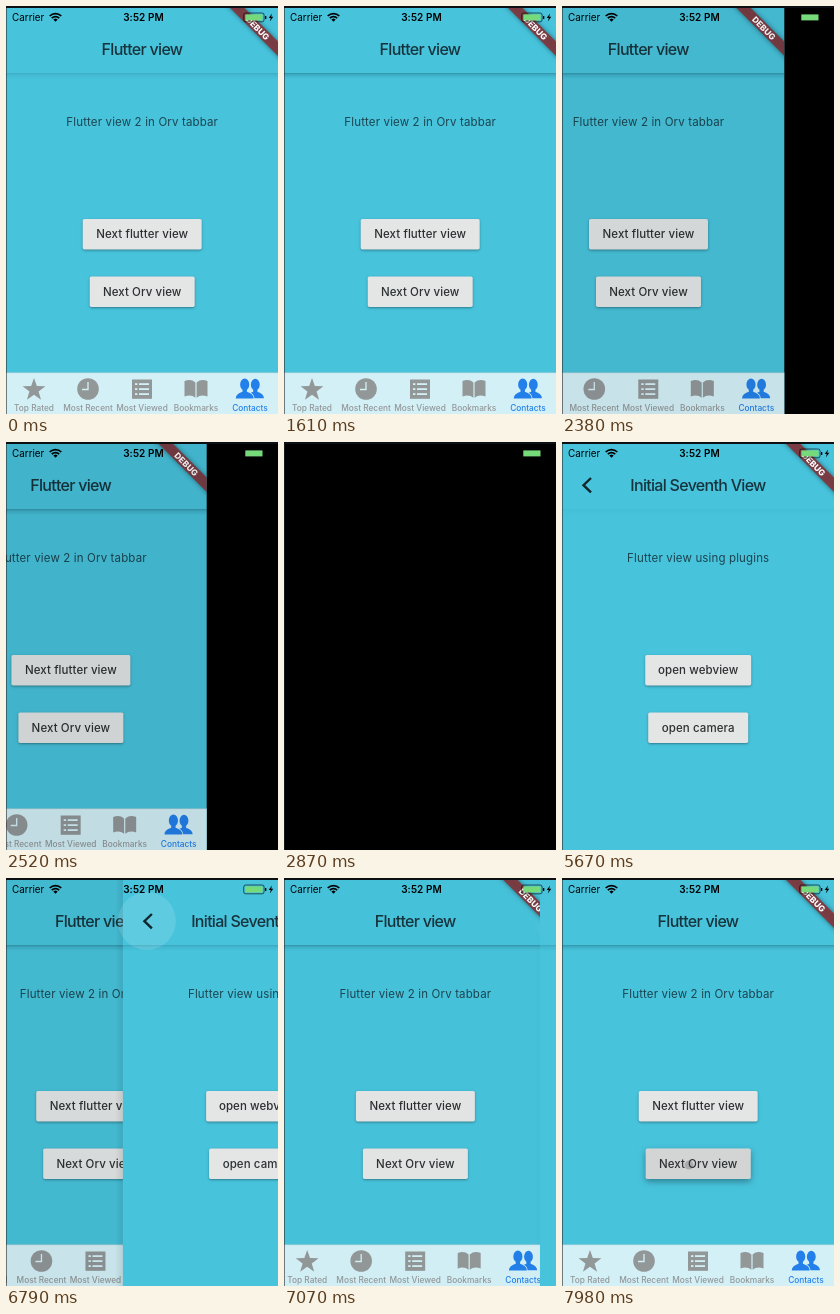
Recreate the animation shown at these times as an HTML page with a canvas. Size 272 px wide and 408 px high, loop 8000 ms.

```html
<!DOCTYPE html>
<html lang="en">
<head>
<meta charset="utf-8">
<title>Flutter tab view</title>
<style>
html, body { margin: 0; width: 100%; height: 100%; overflow: hidden; background: #000; }
canvas { display: block; width: 272px; height: 408px; }
</style>
</head>
<body>
<canvas id="stage" width="272" height="408"></canvas>
<script>
const W = 272, H = 408, LOOP = 8000;
const ctx = document.getElementById('stage').getContext('2d');
const FONT = 'Inter, Roboto, sans-serif';
const BLUE = '#47c3dc', BAR = '#d4f0f7', GRAY = '#929798', ACTIVE = '#2380ea';

// Transition times in ms
const PUSH = 2194, BLANK = 2850, READY = 3570, POP = 6658, POP_END = 7420;

const clamp = v => Math.max(0, Math.min(1, v));
const ramp = (t, from, to) => clamp((t - from) / (to - from));
const pulse = (t, a, b, c, d) => ramp(t, a, b) * (1 - ramp(t, c, d));
const spring = ms => {
  const u = Math.max(0, ms) * 0.011;
  return 1 - (1 + u) * Math.exp(-u);
};

function saved(draw) {
  ctx.save();
  draw();
  ctx.restore();
}

function box(x, y, w, h, color) {
  ctx.fillStyle = color;
  ctx.fillRect(x, y, w, h);
}

function disc(x, y, r, color) {
  ctx.fillStyle = color;
  ctx.beginPath();
  ctx.arc(x, y, r, 0, Math.PI * 2);
  ctx.fill();
}

function line(points, color, width) {
  ctx.strokeStyle = color;
  ctx.lineWidth = width;
  ctx.beginPath();
  points.forEach(([x, y]) => ctx.lineTo(x, y));
  ctx.stroke();
}

function polygon(points, color) {
  ctx.fillStyle = color;
  ctx.beginPath();
  points.forEach(([x, y]) => ctx.lineTo(x, y));
  ctx.fill();
}

function label(text, x, y, size, weight, color, align = 'center', spacing = 0) {
  ctx.font = `${weight} ${size}px ${FONT}`;
  ctx.letterSpacing = spacing + 'px';
  ctx.textAlign = align;
  ctx.textBaseline = 'alphabetic';
  ctx.fillStyle = color;
  ctx.fillText(text, x, y);
}

function button(text, width, y, press = 0, splash = null) {
  const x = 136.2 - width / 2, h = 30.5;
  const shape = () => {
    ctx.beginPath();
    ctx.roundRect(x, y, width, h, 1.8);
  };
  saved(() => {
    ctx.shadowColor = 'rgba(0,0,0,.36)';
    ctx.shadowBlur = 2.4 + press * 4;
    ctx.shadowOffsetY = 0.9 + press * 1.5;
    ctx.fillStyle = '#e4e6e6';
    shape();
    ctx.fill();
  });
  saved(() => {
    shape();
    ctx.clip();
    box(x, y, width, h, `rgba(150,150,150,${0.22 * press})`);
    if (splash) disc(splash.x, splash.y, splash.r, `rgba(110,110,110,${0.4 * splash.alpha})`);
  });
  label(text, 136.2, y + 19.2, 11.5, 500, '#2c3031', 'center', 0.08);
}

function header(title, shadow) {
  const g = ctx.createLinearGradient(0, 67, 0, 73);
  g.addColorStop(0, `rgba(0,40,55,${0.3 * shadow})`);
  g.addColorStop(0.35, `rgba(0,40,55,${0.12 * shadow})`);
  g.addColorStop(1, 'rgba(0,40,55,0)');
  box(0, 67, W, 6, g);
  label(title, 136, 49, 16, 500, '#17333c', 'center', -0.7);
}

function body(text) {
  label(text, 136.2, 120.3, 11.5, 400, '#1c4550', 'center', 0.14);
}

function debugBanner() {
  saved(() => {
    ctx.beginPath();
    ctx.rect(0, 0, W, H);
    ctx.clip();
    ctx.translate(W, 1.8);
    ctx.rotate(Math.PI / 4);
    ctx.shadowColor = 'rgba(0,0,0,.5)';
    ctx.shadowBlur = 5;
    box(-40, 23.8, 80, 10.2, 'rgba(130,54,60,.9)');
    ctx.shadowColor = 'transparent';
    label('DEBUG', 0, 31.9, 8.4, 800, '#fff');
  });
}

function star(x, y, r) {
  const points = Array.from({ length: 10 }, (_, i) => {
    const a = -Math.PI / 2 + i * Math.PI / 5, d = i % 2 ? r * 0.4 : r;
    return [x + d * Math.cos(a), y + d * Math.sin(a)];
  });
  polygon(points, GRAY);
}

function clock(x, y) {
  disc(x, y, 10.8, GRAY);
  line([[x, y - 7], [x, y + 0.5], [x - 6, y + 0.5]], BAR, 1.3);
}

function list(x, y) {
  box(x - 10, y - 9.5, 20, 19.3, GRAY);
  for (const dy of [-5, 0, 5]) {
    box(x - 7, y + dy - 0.8, 2.4, 1.8, BAR);
    box(x - 3, y + dy - 0.8, 10, 1.8, BAR);
  }
}

function book(x, y) {
  for (const side of [-1, 1]) {
    ctx.fillStyle = GRAY;
    ctx.beginPath();
    ctx.moveTo(x + side * 0.6, y - 6.5);
    ctx.quadraticCurveTo(x + side * 5, y - 10.5, x + side * 11.5, y - 8);
    ctx.lineTo(x + side * 11.5, y + 7.5);
    ctx.quadraticCurveTo(x + side * 5, y + 5, x + side * 0.6, y + 8.7);
    ctx.fill();
  }
}

function person(x, y, s) {
  const figure = new Path2D();
  figure.ellipse(x, y - 4 * s, 4.1 * s, 5.4 * s, 0, 0, Math.PI * 2);
  figure.rect(x - 2 * s, y - s, 4 * s, 5 * s);
  figure.moveTo(x - 8 * s, y + 8.5 * s);
  figure.quadraticCurveTo(x - 8 * s, y + 4.5 * s, x - 2 * s, y + 2.5 * s);
  figure.lineTo(x + 2 * s, y + 2.5 * s);
  figure.quadraticCurveTo(x + 8 * s, y + 4.5 * s, x + 8 * s, y + 8.5 * s);
  figure.closePath();
  ctx.strokeStyle = BAR;
  ctx.lineWidth = 1.6;
  ctx.stroke(figure);
  ctx.fillStyle = ACTIVE;
  ctx.fill(figure);
}

function tabBar() {
  box(0, 366.5, W, 41.5, BAR);
  box(0, 366.5, W, 0.6, 'rgba(60,120,135,.35)');
  star(28, 384, 12);
  clock(82, 383);
  list(136, 383);
  book(190, 383);
  person(249.3, 383, 1.08);
  person(238.7, 383, 1.12);
  ['Top Rated', 'Most Recent', 'Most Viewed', 'Bookmarks', 'Contacts'].forEach((name, i) =>
    label(name, 28 + 54 * i, 405.2, 8.3, 500, i === 4 ? ACTIVE : GRAY));
}

function tabView(t) {
  box(0, 0, W, H, BLUE);
  header('Flutter view', 0.5 + 0.5 * ramp(t, 70, 560));
  body('Flutter view 2 in Orv tabbar');
  const first = pulse(t, 1890, 2060, 2160, 2400);
  button('Next flutter view', 119, 213, first, {
    x: 136, y: 229, r: 4 + 60 * ramp(t, 1930, 2350), alpha: pulse(t, 1890, 1960, 2110, 2380)
  });
  const second = ramp(t, 7770, 7970);
  button('Next Orv view', 105, 270.5, second, {
    x: 127, y: 287, r: 2 + 2.5 * second, alpha: second
  });
  tabBar();
  debugBanner();
}

function pluginView(t) {
  box(0, 0, W, H, BLUE);
  header('Initial Seventh View', t > POP ? 0.6 : 0.12);
  disc(24, 43, 18 + 11 * ramp(t, 6560, 6760),
    `rgba(255,255,255,${0.13 * pulse(t, 6560, 6650, 6850, 7100)})`);
  line([[29, 36], [21.5, 43.2], [29, 50.4]], '#12262c', 2.4);
  body('Flutter view using plugins');
  button('open webview', 106, 213);
  button('open camera', 100, 270.5);
  debugBanner();
}

function statusBar() {
  const ink = '#000';
  label('Carrier', 6, 15, 9.9, 400, ink, 'left');
  label('3:52 PM', 137.5, 15, 10, 600, ink, 'center', 0.08);
  [[5.6, 1.7], [8.6, 1.7]].forEach(([r, w]) => {
    ctx.strokeStyle = ink;
    ctx.lineWidth = w;
    ctx.beginPath();
    ctx.arc(49.5, 15.8, r - 0.4, -Math.PI * 0.75, -Math.PI * 0.25);
    ctx.stroke();
  });
  polygon([[49.5, 15.8], [47.3, 13.4], [49.5, 12.6], [51.7, 13.4]], ink);

  ctx.strokeStyle = 'rgba(0,0,0,.75)';
  ctx.lineWidth = 0.8;
  ctx.beginPath();
  ctx.roundRect(237.7, 7, 20.4, 8.8, 2);
  ctx.stroke();
  box(259, 10, 1.3, 3, ink);
  box(239.3, 8.4, 17.2, 6, '#76da7b');
  polygon([[266, 7.5], [262.7, 12], [264.8, 12], [263.8, 15.6], [267.3, 10.8], [265.2, 10.8]], ink);
}

function render(t) {
  box(0, 0, W, H, '#000');
  const popping = t >= POP && t < POP_END;
  const away = t >= POP ? 1 - spring(t - POP) : spring(t - PUSH);
  const depth = t >= POP_END ? 0 : away;

  if (t < BLANK || t >= POP) {
    saved(() => {
      ctx.translate(-81.6 * depth, 0);
      tabView(t);
      box(0, 0, W, H, `rgba(0,20,28,${0.1 * depth})`);
    });
  }
  if (t >= READY && t < POP_END) {
    const x = popping ? W * (1 - away) : 0;
    if (popping) {
      const shade = ctx.createLinearGradient(x - 8, 0, x, 0);
      shade.addColorStop(0, 'rgba(0,0,0,0)');
      shade.addColorStop(1, `rgba(0,0,0,${0.16 * away})`);
      box(x - 8, 0, 8, H, shade);
    }
    saved(() => {
      ctx.translate(x, 0);
      pluginView(t);
    });
  }
  statusBar();
  box(0, 0, 1, H, 'rgba(40,44,46,.6)');
  box(0, 0, W, 2, '#0c1012');
}

function tick() {
  render(performance.now() % LOOP);
  requestAnimationFrame(tick);
}
tick();
</script>
</body>
</html>
```
